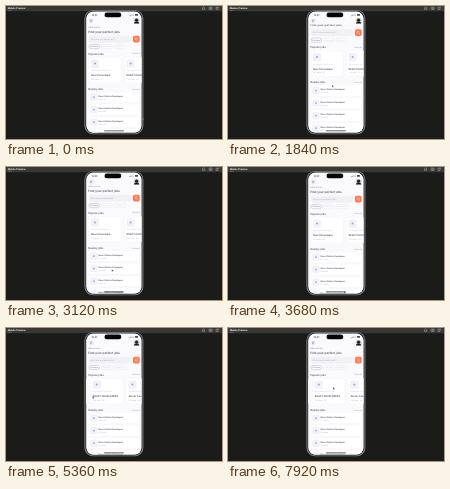
Write an HTML page that moves like this. It is 216x133 px and loops after 8 s.

```html
<!DOCTYPE html>
<html lang="en">
<head>
<meta charset="utf-8">
<title>Job search app</title>
<style>
  html, body { margin: 0; width: 100%; height: 100%; overflow: hidden; background: #1b1b19; }
  svg { display: block; width: 100vw; height: 100vh; }
  text { font-family: Inter, Roboto, sans-serif; text-rendering: geometricPrecision; }
</style>
</head>
<body>
<svg id="stage" viewBox="0 0 216 133">
  <defs>
    <clipPath id="screen"><rect x="80.2" y="5.6" width="55.4" height="121" rx="7"/></clipPath>
    <clipPath id="body"><rect x="80" y="18.4" width="56" height="109"/></clipPath>
  </defs>
  <rect width="216" height="133" fill="#1b1b19"/>
  <rect width="216" height="5.2" fill="#393834"/>
  <text x="1.7" y="2.7" font-size="2.4" font-weight="700" fill="#f4f4f4">Mobile Preview</text>
  <text x="1.7" y="4.8" font-size="1.8" fill="#aaa">v16.2</text>
  <g fill="none" stroke="#b5b4b0" stroke-width=".5">
    <path d="M196 2.2l1.6-1.4 1.6 1.4M196.5 2v1.4h2.2V2"/>
    <rect x="203" y="1.1" width="3.2" height="2.3" rx=".4"/>
    <circle cx="204.6" cy="2.25" r=".5"/>
    <path d="M210 1.2h2v2.2h-2zM212 .7l1.2 1"/>
  </g>
  <rect x="78.4" y="3.9" width="59" height="124.4" rx="8.8" fill="#858587"/>
  <rect x="79.4" y="4.8" width="57" height="122.6" rx="7.8" fill="#1c1c1e"/>
  <g clip-path="url(#screen)">
    <rect x="80" y="5" width="56" height="122" fill="#fafafc"/>
    <g clip-path="url(#body)"><g id="page"></g></g>
    <text x="85.5" y="9.9" font-size="2.4" font-weight="600" fill="#444">12:01</text>
    <path d="M123 9.9h.5M124 9.9v-.8M125 9.9v-1.4M126.4 9.1h1.3" stroke="#444" stroke-width=".5"/>
    <rect x="129" y="8.1" width="3" height="1.6" rx=".4" fill="#444"/>
    <rect x="98.5" y="6.6" width="16.8" height="4.6" rx="2.3" fill="#050505"/>
    <rect x="82.8" y="12.6" width="4.8" height="4.8" rx="1.2" fill="#eeeef5"/>
    <path d="M84 14.2h2.4M84 15.6h1.6" stroke="#6c6a90" stroke-width=".5"/>
    <rect x="127.8" y="12" width="5.6" height="5.6" rx="1.5" fill="#cfd0d3"/>
    <path d="M127.9 17.6q.2-2.2 2.7-2.2t2.7 2.2z" fill="#17171c"/>
    <circle cx="130.6" cy="14.2" r="1.6" fill="#252329"/>
    <rect x="98" y="124.4" width="20" height=".8" rx=".4" fill="#333"/>
  </g>
  <path id="cursor" d="M0 0v2.4l.7-.5.5 1 .4-.2-.5-1 .9-.1z" fill="#444" stroke="#fff" stroke-width=".2"/>
</svg>
<script>
const LOOP = 8000;
const INK = '#55536b', GREY = '#b0aebb', PALE = '#cac9d3';
const $ = id => document.getElementById(id);

const text = (x, y, size, fill, str, weight = 400) =>
  `<text x="${x}" y="${y}" font-size="${size}" fill="${fill}" font-weight="${weight}">${str}</text>`;
const box = (x, y, w, h, r, fill, stroke = 'none') =>
  `<rect x="${x}" y="${y}" width="${w}" height="${h}" rx="${r}" fill="${fill}" stroke="${stroke}" stroke-width=".3"/>`;
const logo = (x, y, size) =>
  box(x, y, size, size, 1.6, '#f1f2f8') +
  `<circle cx="${x + size / 2}" cy="${y + size / 2}" r="${size * .12}" fill="#93a5e0"/>`;

const PITCH = 35.6;
const titles = ['React Developer', 'REACT DEVELOPERS', 'Senior Content Dev', 'REMOTE Cross-Plat'];

const jobCard = (title, i) => {
  const x = 82.8 + i * PITCH;
  return box(x, 51.3, 32.4, 25.6, 2.4, '#fff', '#ebebf1') + logo(x + 2, 53.4, 8.4) +
    text(x + 2.2, 65.2, 1.9, PALE, 'Northfield Staffing Co') +
    text(x + 2.2, 70.2, 2.5, INK, title, 600) +
    text(x + 2.2, 73.8, 1.9, GREY, 'Full-time · US');
};
const nearbyRow = i => {
  const y = 85.6 + i * 12.5;
  return box(82.8, y, 51, 11.2, 2, '#fff', '#ebebf1') + logo(84.2, y + 1.8, 7.4) +
    text(92.6, y + 5.2, 2.15, INK, 'React Native Developer', 600) +
    text(92.6, y + 8.3, 1.8, GREY, 'Full-time');
};
const pill = (x, w, label, on) =>
  box(x, 38.4, w, 4.3, 2.1, '#fafafc', on ? '#8b89a0' : '#dadae2') +
  text(x + 1.6, 41.2, 1.75, on ? INK : PALE, label);

$('page').innerHTML =
  text(82.2, 21.8, 2.2, '#8d8b9f', 'Hello Lorian') +
  text(82.2, 26.7, 3, INK, 'Find your perfect jobs', 600) +
  box(82.6, 29.8, 42.6, 6.7, 1.8, '#f0f0f5') +
  text(84.4, 33.9, 2, GREY, 'What are you looking for?') +
  box(127, 29.8, 6.7, 6.7, 1.7, '#ff7650') +
  '<path d="M131.2 34l.8.8M131.4 32.8a1.2 1.2 0 1 1-2.4 0a1.2 1.2 0 1 1 2.4 0" fill="none" stroke="#fff" stroke-width=".35"/>' +
  pill(83, 10.6, 'Full-time', true) + pill(95.2, 11.2, 'Part-time') + pill(108, 12, 'Contract') +
  text(82.2, 48.6, 2.65, INK, 'Popular jobs', 500) +
  text(126, 48.4, 2, '#9998b0', 'Show all') +
  `<g id="cards">${titles.map(jobCard).join('')}</g>` +
  text(82.2, 83.9, 2.65, INK, 'Nearby jobs', 500) +
  text(126, 83.7, 2, '#9998b0', 'Show all') +
  Array.from({ length: 6 }, (_, i) => nearbyRow(i)).join('');

// Tracks: [time, ...values], eased between neighbours
const scrollY = [[0, 0], [1680, 0], [2240, 32.4], [2480, 32.4], [3200, 1], [8000, 1]];
const scrollX = [[0, 0], [4800, 0], [5360, 33.8], [5760, 33.8], [6640, 84], [7120, 33.8], [8000, 33.8]];
const pointer = [[0, 135.5, 111], [880, 135.5, 111], [1680, 104, 84], [2320, 103.4, 51.5],
  [2480, 103.4, 51.5], [3280, 106, 108], [3680, 116, 124], [4160, 110, 70], [4800, 112, 68],
  [5360, 86.5, 68], [5760, 108, 70], [6640, 96, 73], [7120, 107, 62], [7920, 105, 59], [8000, 105, 59]];

function sample(track, t) {
  const i = Math.max(1, track.findIndex(key => key[0] > t));
  const a = track[i - 1], b = track[i];
  const p = (t - a[0]) / (b[0] - a[0]);
  const e = p * p * (3 - 2 * p);
  return a.slice(1).map((v, k) => v + (b[k + 1] - v) * e);
}

function draw(t) {
  const [y] = sample(scrollY, t), [x] = sample(scrollX, t);
  $('page').setAttribute('transform', `translate(0 ${-y})`);
  $('cards').setAttribute('transform', `translate(${-x} 0)`);
  $('cursor').setAttribute('transform', `translate(${sample(pointer, t)})`);
}

function tick() {
  draw(performance.now() % LOOP);
  requestAnimationFrame(tick);
}
tick();
</script>
</body>
</html>
```
